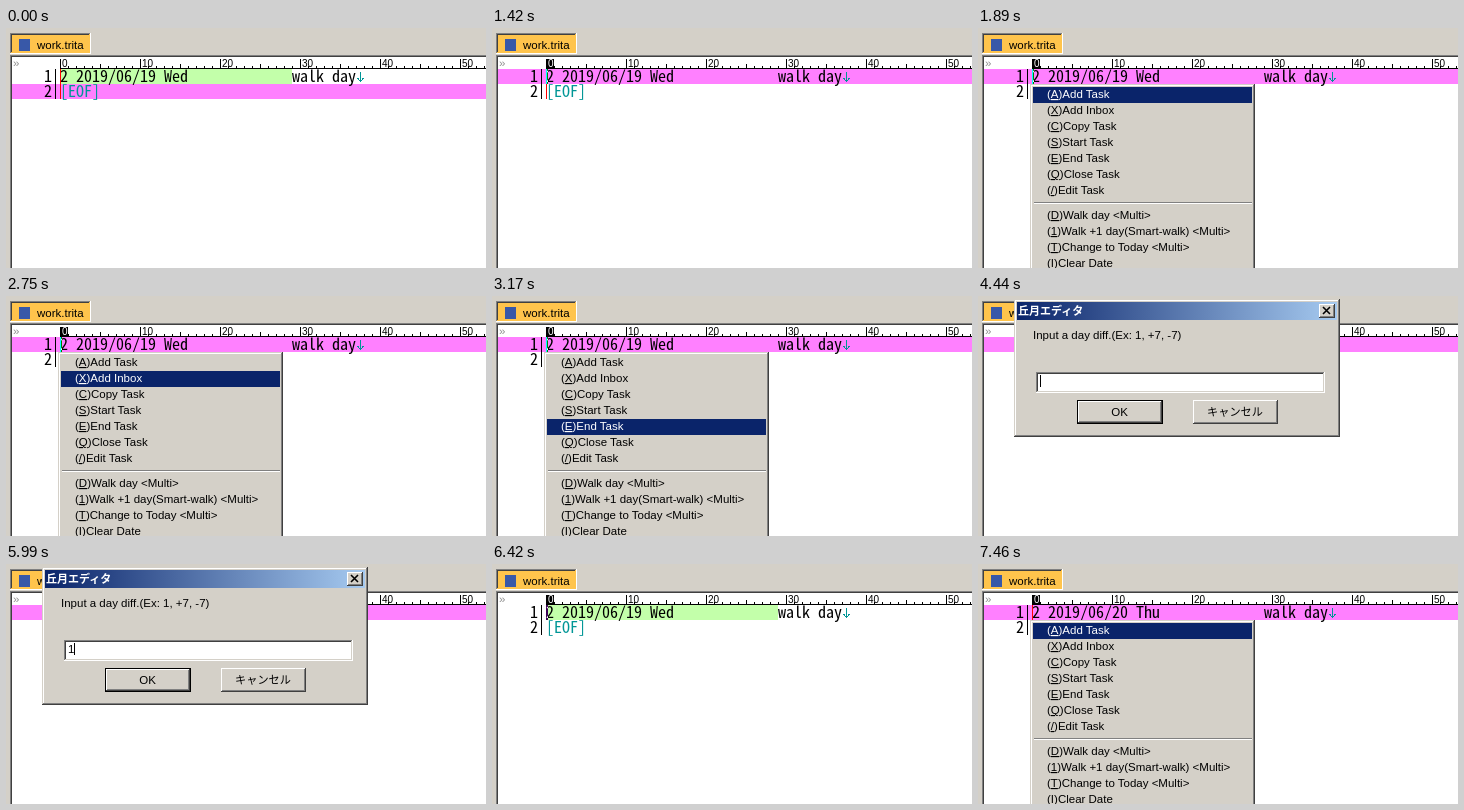
An HTML page for the animation above (8000 ms loop, 480 px wide and 240 px high).

```html
<!DOCTYPE html>
<html lang="ja">
<head>
<meta charset="utf-8">
<title>Editor</title>
<style>
html, body { margin: 0; width: 100%; height: 100%; overflow: hidden; background: #fff; }
svg { display: block; width: 480px; height: 240px; }
text { white-space: pre; font: 11.5px "Liberation Sans", "Noto Sans CJK JP", "Noto Sans CJK", sans-serif; }
text.code { font: 16px "Noto Sans Mono CJK JP", "Noto Sans Mono", monospace; }
text.tiny { font-size: 10px; }
text.title { font-size: 11px; font-weight: bold; }
text.kana { font-size: 11.2px; }
.caret { mix-blend-mode: difference; }
</style>
</head>
<body>
<svg viewBox="0 0 480 240" shape-rendering="crispEdges"></svg>
<script>
const svg = document.querySelector('svg');
const FACE = '#d4d0c8', PINK = '#ff80ff', GREEN = '#c3ffaa', NAVY = '#0a246a', TEAL = '#009696';
const CELL = 8, LEFT = 54, ROWS = [41, 56], ROW_H = 15;

function add(parent, tag, attrs, content) {
  const el = document.createElementNS('http://www.w3.org/2000/svg', tag);
  for (const k in attrs) el.setAttribute(k, attrs[k]);
  if (content !== undefined) el.textContent = content;
  parent.appendChild(el);
  return el;
}
const group = parent => add(parent, 'g', {});
const rect = (p, x, y, width, height, fill) => add(p, 'rect', { x, y, width, height, fill });
const text = (p, x, y, s, fill = '#000', cls = '', anchor = 'start') =>
  add(p, 'text', { x, y, fill, class: cls, 'text-anchor': anchor }, s);
const show = (el, on) => { el.style.display = on ? '' : 'none'; };

// One-pixel frame with light and dark sides
function bevel(p, x, y, w, h, topLeft, bottomRight) {
  rect(p, x, y, w, 1, topLeft);
  rect(p, x, y, 1, h, topLeft);
  rect(p, x, y + h - 1, w, 1, bottomRight);
  rect(p, x + w - 1, y, 1, h, bottomRight);
}
function panel(p, x, y, w, h) {
  rect(p, x, y, w, h, FACE);
  bevel(p, x, y, w, h, FACE, '#404040');
  bevel(p, x + 1, y + 1, w - 2, h - 2, '#fff', '#808080');
}
function button(p, x, y, w, h) {
  rect(p, x, y, w, h, FACE);
  bevel(p, x, y, w, h, '#fff', '#404040');
  bevel(p, x + 1, y + 1, w - 2, h - 2, FACE, '#808080');
}

// Keep the editor font on its cell grid
const pen = document.createElement('canvas').getContext('2d');
pen.font = '16px "Noto Sans Mono CJK JP", "Noto Sans Mono", monospace';
const spacing = CELL - pen.measureText('0').width;
function code(p, x, y, s, fill = '#000') {
  const el = text(p, x, y, s, fill, 'code');
  el.style.letterSpacing = spacing + 'px';
  return el;
}

// Window and tab
rect(svg, 0, 0, 480, 240, '#fff');
rect(svg, 0, 0, 480, 27, FACE);
rect(svg, 0, 27, 4, 213, FACE);
rect(svg, 4, 27, 476, 1, '#808080');
rect(svg, 4, 27, 1, 213, '#808080');
rect(svg, 5, 28, 475, 1, '#404040');
rect(svg, 5, 28, 1, 212, '#404040');
rect(svg, 4, 5, 81, 21, '#ffc44c');
bevel(svg, 4, 5, 81, 21, '#808080', '#fff');
bevel(svg, 5, 6, 79, 19, '#404040', '#ffc44c');
rect(svg, 13, 11, 11, 12, '#3858a8');
text(svg, 31, 21, 'work.trita');

// Ruler
text(svg, 7, 39, '»', '#909090');
rect(svg, LEFT, 40, 426, 1, '#000');
for (let col = 0; LEFT + col * CELL < 480; col++) {
  const x = LEFT + col * CELL;
  const h = col % 10 === 0 ? 9 : col % 5 === 0 ? 4 : 2;
  rect(svg, x, 40 - h, 1, h, '#000');
  if (col % 10 === 0) text(svg, x + 2, 39, col, '#000', 'tiny');
}
const mark = group(svg);
rect(mark, LEFT, 31, CELL, 10, '#000');
text(mark, LEFT + 2, 39, '0', '#fff', 'tiny');

// Text lines
const green = rect(svg, LEFT, ROWS[0], 29 * CELL, ROW_H, GREEN);
const bar = rect(svg, 6, ROWS[0], 474, ROW_H, PINK);
code(svg, 38, 54, '1');
code(svg, 38, 69, '2');
rect(svg, 49, ROWS[0], 1, 2 * ROW_H, '#000');
const date = code(svg, LEFT, 54, '');
code(svg, LEFT + 29 * CELL, 54, 'walk day');
add(svg, 'path', { d: 'M354.5 44V53M351.5 50L354.5 53.5L357.5 50', fill: 'none', stroke: TEAL });
code(svg, LEFT, 69, '[EOF]', TEAL);
const guide = rect(svg, LEFT, ROWS[0], 1, 2 * ROW_H, '#f00');
const caret = rect(svg, LEFT, ROWS[0], 2, ROW_H, '#fff');
caret.classList.add('caret');

// Menu
const menu = group(svg);
panel(menu, 52, 56, 225, 220);
rect(menu, 56, 174, 218, 1, '#808080');
rect(menu, 56, 175, 218, 1, '#fff');
const itemTop = i => i < 7 ? 59 + 16 * i : 180 + 16 * (i - 7);
const glow = rect(menu, 55, 59, 219, 16, NAVY);
const items = [
  'A|Add Task', 'X|Add Inbox', 'C|Copy Task', 'S|Start Task', 'E|End Task', 'Q|Close Task', '/|Edit Task',
  'D|Walk day <Multi>', '1|Walk +1 day(Smart-walk) <Multi>', 'T|Change to Today <Multi>', 'I|Clear Date'
].map((item, i) => {
  const [key, label] = item.split('|');
  const el = text(menu, 69, itemTop(i) + 11, '(');
  add(el, 'tspan', { 'text-decoration': 'underline' }, key);
  add(el, 'tspan', {}, ')' + label);
  return el;
});

// Dialog
const dialog = group(svg);
const fade = add(add(svg, 'defs', {}), 'linearGradient', { id: 'fade' });
add(fade, 'stop', { offset: 0, 'stop-color': NAVY });
add(fade, 'stop', { offset: 1, 'stop-color': '#a6caf0' });
panel(dialog, 36, 3, 326, 138);
rect(dialog, 39, 6, 320, 18, 'url(#fade)');
text(dialog, 40, 19, '丘月エディタ', '#fff', 'title');
button(dialog, 341, 8, 16, 14);
add(dialog, 'path', { d: 'M345 11L352 18M352 11L345 18', stroke: '#000', 'stroke-width': 1.6, 'shape-rendering': 'auto' });
text(dialog, 55, 43, 'Input a day diff.(Ex: 1, +7, -7)');
rect(dialog, 58, 76, 289, 21, '#fff');
bevel(dialog, 58, 76, 289, 21, '#808080', '#fff');
bevel(dialog, 59, 77, 287, 19, '#404040', FACE);
rect(dialog, 99, 104, 86, 24, '#000');
button(dialog, 100, 105, 84, 22);
text(dialog, 141.5, 120, 'OK', '#000', '', 'middle');
button(dialog, 215, 104, 85, 24);
text(dialog, 257, 120, 'キャンセル', '#000', 'kana', 'middle');
const typed = text(dialog, 62, 89, '1');
const inputCaret = rect(dialog, 62, 79, 1, 12, '#000');

// Each step changes only the listed properties
const LOOP = 8000;
const START = {
  mark: false, row: 1, caret: false, guide: true, date: '19 Wed',
  item: -1, dialog: false, typed: false, inputCaret: true
};
const STEPS = [
  [560, { mark: true, caret: true }],
  [1150, { caret: false }],
  [1420, { row: 0, caret: true }],
  [1890, { item: 0 }],
  [2750, { item: 1 }],
  [2900, { item: 2 }],
  [3020, { item: 3 }],
  [3170, { item: 4 }],
  [3450, { item: 5 }],
  [3600, { item: 6 }],
  [3730, { item: 7 }],
  [4440, { item: -1, dialog: true }],
  [5000, { inputCaret: false }],
  [5580, { inputCaret: true }],
  [5990, { typed: true }],
  [6420, { dialog: false, row: -1, guide: false }],
  [6570, { row: 0, guide: true, date: '20 Thu' }],
  [7160, { caret: false }],
  [7460, { item: 0 }]
];

function draw(time) {
  const s = { ...START };
  for (const [at, change] of STEPS) if (time >= at) Object.assign(s, change);
  show(mark, s.mark);
  show(bar, s.row >= 0);
  show(green, s.row !== 0);
  bar.setAttribute('y', ROWS[Math.max(s.row, 0)]);
  caret.setAttribute('y', ROWS[Math.max(s.row, 0)]);
  show(caret, s.caret);
  show(guide, s.guide);
  date.textContent = '2 2019/06/' + s.date;
  show(menu, s.item >= 0);
  glow.setAttribute('y', itemTop(Math.max(s.item, 0)));
  items.forEach((el, i) => el.setAttribute('fill', i === s.item ? '#fff' : '#000'));
  show(dialog, s.dialog);
  show(typed, s.typed);
  show(inputCaret, s.inputCaret);
  inputCaret.setAttribute('x', s.typed ? 68 : 62);
}

const begin = performance.now();
function tick() {
  draw((performance.now() - begin) % LOOP);
  requestAnimationFrame(tick);
}
tick();
</script>
</body>
</html>
```
